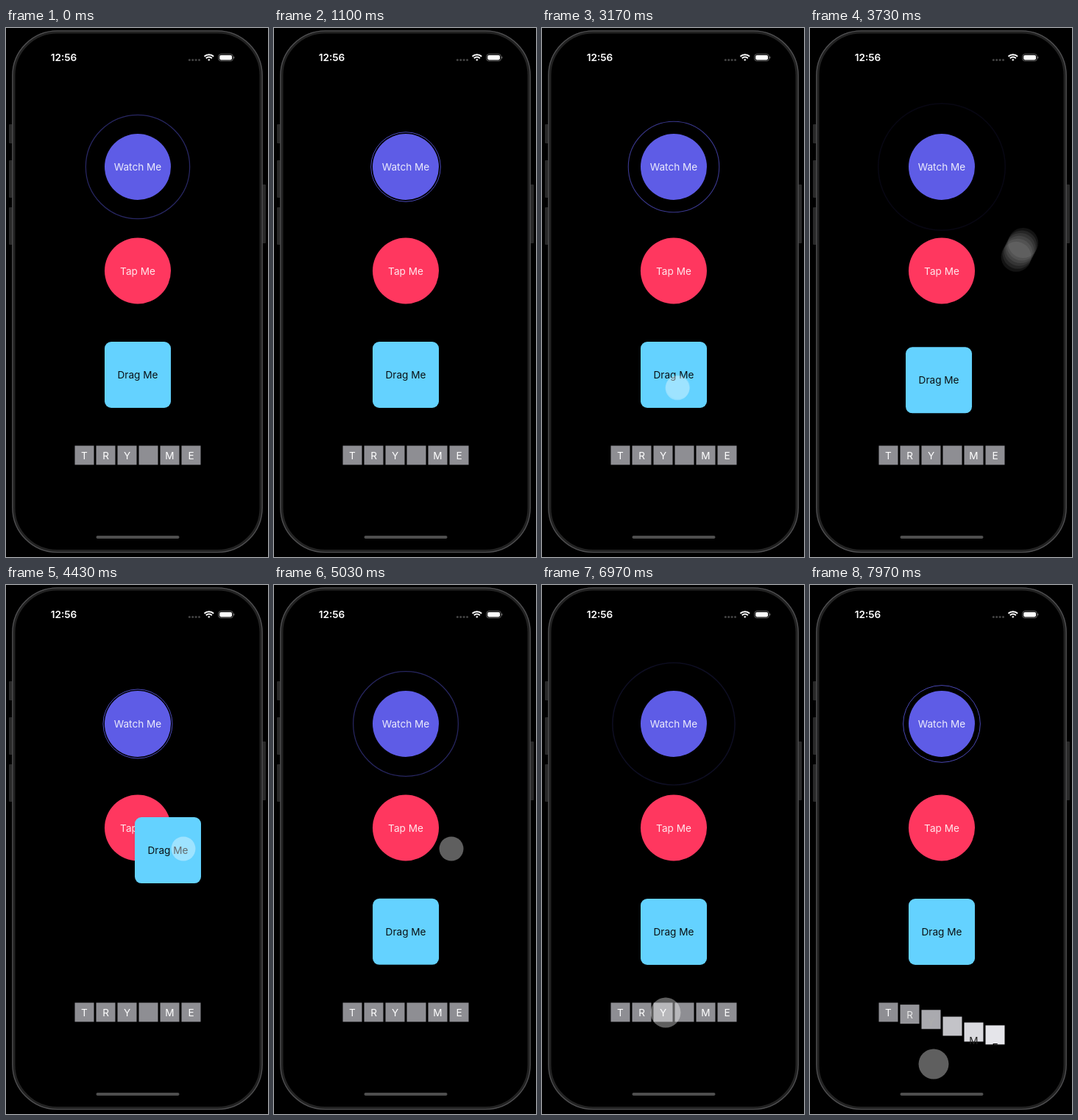
An HTML page for the animation above (8 s loop, 356x720 px).

```html
<!DOCTYPE html>
<html lang="en">
<head>
<meta charset="utf-8">
<title>Touch animations</title>
<style>
  html, body { margin: 0; width: 100%; height: 100%; overflow: hidden; background: #000; }
  svg { display: block; width: 100%; height: 100%; }
  text { font: 13.6px Inter, "Open Sans", sans-serif; text-anchor: middle; fill: #fff; }
</style>
</head>
<body>
<svg viewBox="0 0 356 720">
  <rect width="356" height="720"/>

  <g fill="#292929">
    <rect x="4" y="131" width="5" height="26" rx="1"/>
    <rect x="4" y="180" width="5" height="51" rx="1"/>
    <rect x="4" y="244" width="5" height="51" rx="1"/>
    <rect x="348" y="213" width="5" height="80" rx="1"/>
  </g>
  <rect x="10.5" y="5.5" width="336" height="706.5" rx="59" stroke="#222" stroke-width="4"/>
  <rect x="8.8" y="3.8" width="339.4" height="709.9" rx="61" fill="none" stroke="#505052" stroke-width="1.3"/>

  <text x="78.5" y="45" style="font-weight:600">12:56</text>
  <g fill="#444">
    <circle cx="249.3" cy="43.5" r="1.5"/><circle cx="253.7" cy="43.5" r="1.5"/>
    <circle cx="258.1" cy="43.5" r="1.5"/><circle cx="262.5" cy="43.5" r="1.5"/>
  </g>
  <g fill="none" stroke="#fff" stroke-width="2">
    <path d="M269.5 38.8a9 9 0 0 1 12.6 0M271.8 41.2a5.8 5.8 0 0 1 8 0"/>
    <path d="M275.8 45l-1.7-1.9a2.5 2.5 0 0 1 3.4 0z" fill="#fff" stroke="none"/>
  </g>
  <rect x="288.8" y="35.6" width="19.6" height="9.2" rx="3" fill="none" stroke="#666" stroke-width="1"/>
  <rect x="290.2" y="37" width="16.8" height="6.4" rx="1.8" fill="#fff"/>
  <rect x="309.2" y="38.7" width="1.2" height="3" rx=".6" fill="#666"/>
  <rect x="122.5" y="691" width="113" height="4" rx="2" fill="#4e4e4e"/>

  <circle id="ring" cx="179" cy="189" r="45" fill="none" stroke="#5e5ce6"/>
  <circle cx="179" cy="189" r="45" fill="#5e5ce6"/>
  <text x="179" y="194" fill-opacity=".88">Watch Me</text>

  <circle id="tap" cx="179" cy="330.5" r="45" fill="#ff375f"/>
  <text id="tapLabel" x="179" y="335.5" fill-opacity=".88">Tap Me</text>

  <g id="box">
    <rect x="134" y="427" width="90" height="90" rx="9" fill="#64d2ff"/>
    <text x="179" y="477" style="fill:#0a1114">Drag Me</text>
  </g>
  <g id="tiles"></g>
  <g id="cursor" fill="#fff" fill-opacity=".074"></g>
</svg>
<script>
const LOOP = 8000;
const $ = id => document.getElementById(id);
const clamp = v => Math.max(0, Math.min(1, v));
const mix = (a, b, k) => a + (b - a) * k;
const smooth = u => u * u * (3 - 2 * u);
const move = (node, x, y) => node.setAttribute('transform', `translate(${x} ${y})`);

function add(parent, tag, attrs) {
  const node = document.createElementNS('http://www.w3.org/2000/svg', tag);
  for (const key in attrs) node.setAttribute(key, attrs[key]);
  return parent.appendChild(node);
}

// cubic-bezier(.42, 0, .58, 1)
function easeInOut(x) {
  let lo = 0, hi = 1;
  for (let i = 0; i < 24; i++) {
    const t = (lo + hi) / 2, q = 1 - t;
    if (1.26 * q * q * t + 1.74 * q * t * t + t * t * t < x) lo = t; else hi = t;
  }
  return smooth(lo);
}

// Returns from 1 to 0 with a small overshoot
function spring(ms) {
  const s = ms / 1000, damping = 0.7, omega = 14.7;
  const root = Math.sqrt(1 - damping * damping), a = omega * root * s;
  return Math.exp(-damping * omega * s) * (Math.cos(a) + damping / root * Math.sin(a));
}

// Cursor stops: time, x, y
const path = [
  [1200, 390, 400], [1650, 172, 336], [2350, 172, 336], [2800, 184, 490],
  [3175, 184, 490], [3400, 270, 330], [3460, 270, 330], [3620, 302, 268],
  [4050, 200, 470], [4200, 200, 470], [4400, 241, 359], [5745, 241, 359],
  [6245, 168, 582], [7470, 168, 582], [7690, 168, 654], [7970, 168, 652]
];
const presses = [[1680, 1800], [2980, 3430], [4150, 5090], [7380, 7720]];
const drags = [
  { start: 3175, release: 3430 },
  { start: 4200, release: 4430 }
];

function cursorAt(t) {
  const next = path.findIndex(stop => stop[0] > t);
  if (next === 0) return path[0].slice(1);
  if (next < 0) return path[path.length - 1].slice(1);
  const [t0, x0, y0] = path[next - 1], [t1, x1, y1] = path[next];
  const k = smooth((t - t0) / (t1 - t0));
  return [mix(x0, x1, k), mix(y0, y1, k)];
}

function boxOffset(t) {
  const drag = drags.filter(d => d.start <= t).pop();
  if (!drag) return [0, 0];
  const from = cursorAt(drag.start), to = cursorAt(Math.min(t, drag.release));
  const k = t > drag.release ? spring(t - drag.release) : 1;
  return [(to[0] - from[0]) * k, (to[1] - from[1]) * k];
}

function shake(ms) {
  return 12 * Math.exp(-ms / 300) * Math.sin(ms / 180 * 2 * Math.PI);
}

// Smooth hump from 0 to 1 and back
function pulse(t, centre, half) {
  const u = (t - centre) / half;
  return Math.abs(u) < 1 ? Math.cos(u * Math.PI / 2) ** 2 : 0;
}

const tiles = [...'TRY ME'].map((letter, i) => {
  const x = 93.5 + 29 * i;
  const rect = add($('tiles'), 'rect', { x, y: 568.5, width: 26, height: 26 });
  const label = add($('tiles'), 'text', { x: x + 13, y: 586.5 });
  label.textContent = letter;
  return { rect, label };
});
const ghosts = Array.from({ length: 6 }, () => add($('cursor'), 'circle', {}));

function drawRing(t) {
  const age = (t + 810) % 1672;
  const k = easeInOut(Math.min(1, age / 1500));
  $('ring').setAttribute('r', 45 * (1 + k));
  $('ring').setAttribute('stroke-width', 0.8 * (1 + k));
  $('ring').setAttribute('stroke-opacity', 1 - k);
}

function drawTiles(t) {
  tiles.forEach(({ rect, label }, i) => {
    const local = t - 50 * i;
    const k = pulse(local, 7710, 260);
    move(rect, 0, 31 * k);
    move(label, 0, 50 * pulse(local, 7675, 300));
    const grey = mix(142, 229, k), ink = 255 * (1 - k);
    rect.setAttribute('fill', `rgb(${grey},${grey},${grey + 5})`);
    label.style.fill = `rgb(${ink},${ink},${ink})`;
  });
}

function drawCursor(t) {
  let press = 0;
  for (const [down, up] of presses) {
    press = Math.max(press, Math.min(clamp((t - down) / 100), 1 - clamp((t - up) / 100)));
  }
  $('cursor').style.display = t < 1200 ? 'none' : '';
  ghosts.forEach((ghost, i) => {
    const [x, y] = cursorAt(t + (i - 2.5) * 7);
    ghost.setAttribute('cx', x);
    ghost.setAttribute('cy', y);
    ghost.setAttribute('r', 20.5 - 4 * press);
  });
}

function draw(t) {
  drawRing(t);
  const tapped = t - 1750;
  move($('tap'), tapped > 0 ? shake(tapped) : 0, 0);
  move($('tapLabel'), tapped > 0 ? shake(tapped + 13) : 0, 0);
  move($('box'), ...boxOffset(t));
  drawTiles(t);
  drawCursor(t);
}

const begin = performance.now();
function frame() {
  draw((performance.now() - begin) % LOOP);
  requestAnimationFrame(frame);
}
frame();
</script>
</body>
</html>
```
